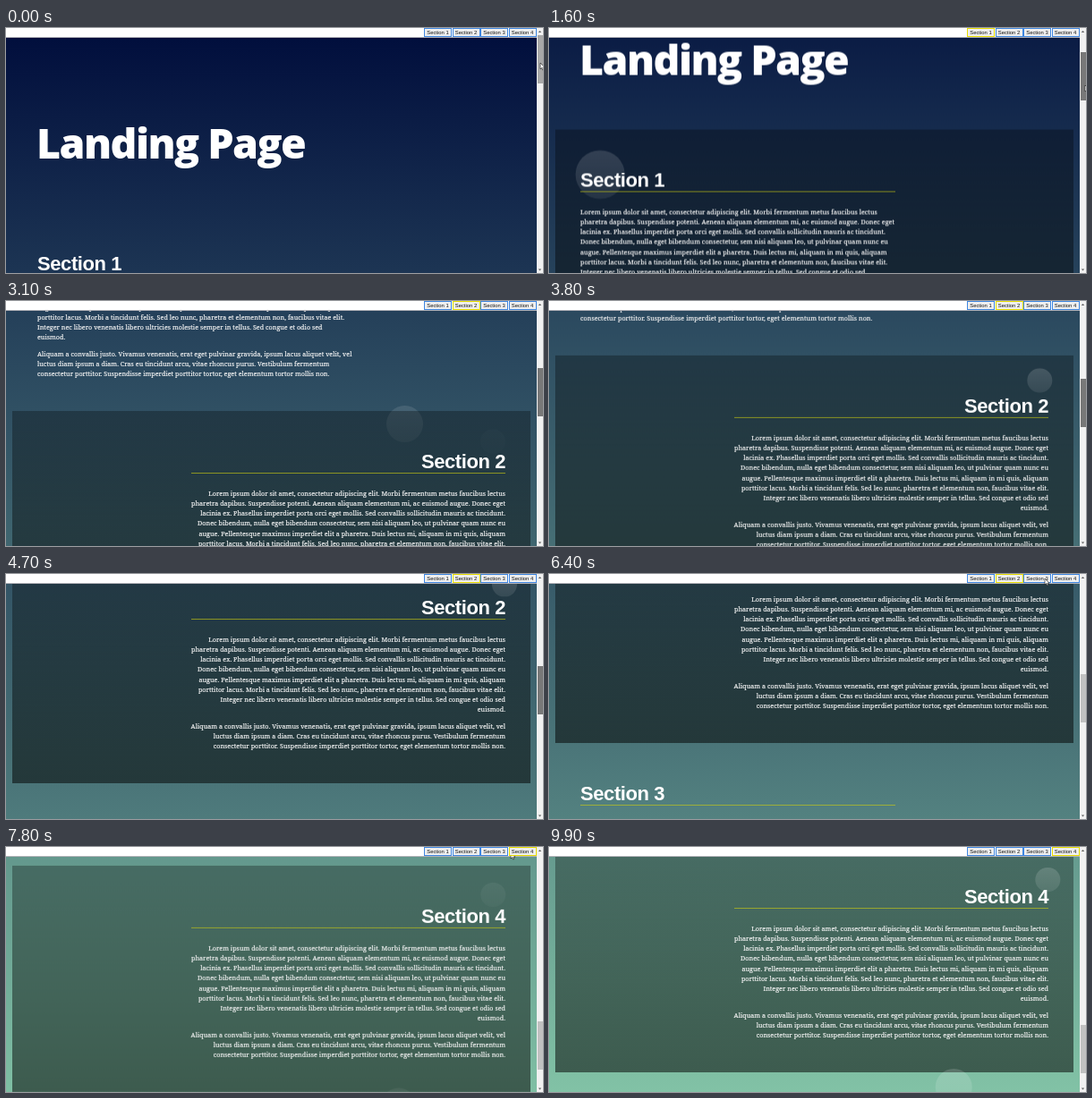
Animation of 600 by 274 pixels, one loop 10 s. Source, as an HTML page:

```html
<!DOCTYPE html>
<html lang="en">
<head>
<meta charset="utf-8">
<title>Landing Page</title>
<style>
html, body { margin: 0; width: 100%; height: 100%; overflow: hidden; }
#stage { position: relative; width: 600px; height: 274px; overflow: hidden; background: #000d3c; }
#page { position: absolute; left: 0; top: 0; width: 593px; height: 1303px;
  background: linear-gradient(#000d3c, #88cbab); will-change: transform; }
h1, h2, p { margin: 0; position: absolute; white-space: nowrap; }
h1 { left: 34px; top: 95.5px; font: 800 46.5px/64px "Open Sans", sans-serif; letter-spacing: -1.55px; color: #fff; }
section { position: absolute; left: 7px; width: 579px; height: 253px; }
.shade { position: absolute; inset: 0; background: linear-gradient(rgba(0,0,0,.3), rgba(0,0,0,.52)); }
.text { position: absolute; left: 28px; top: 0; width: 351.5px; height: 100%; }
.even .text { left: 199.5px; text-align: right; }
h2 { left: 0; right: 0; top: 45px; height: 24.5px; font: 700 22px/24px "Liberation Sans", Arial, sans-serif;
  letter-spacing: -.42px; color: #fff; border-bottom: 1px solid rgba(204,204,17,.62); }
p { left: 0; right: 0; font: 7.15px/11.25px "Noto Serif", serif; letter-spacing: .046px;
  color: #f4f4f4; -webkit-text-stroke: .18px #f4f4f4; }
p.a { top: 87.2px; }
p.b { top: 184.1px; }
p span { display: block; }
.orb { position: absolute; border-radius: 50%; background: linear-gradient(rgba(255,255,255,.16), rgba(255,255,255,.09)); }
#nav { position: absolute; left: 0; top: 0; width: 593px; height: 10px; background: #fff; border-bottom: 1px solid rgba(0,0,20,.3); }
#nav div { position: absolute; top: 0; width: 31px; height: 10px; box-sizing: border-box;
  border: 1.3px solid #3f86e0; background: #efefef; color: #111; text-align: center;
  font: 5.9px/9.2px "Liberation Sans", Arial, sans-serif; }
#nav div.on { border-color: #e6dc00; }
#bar { position: absolute; left: 593px; top: 0; width: 7px; height: 274px; background: #f1f1f1; }
#thumb { position: absolute; left: 1px; width: 6px; height: 54px; }
svg { position: absolute; overflow: visible; left: 0; top: 0; }
</style>
</head>
<body>
<div id="stage">
  <div id="page"><h1>Landing Page</h1></div>
  <div id="nav"></div>
  <div id="bar">
    <div id="thumb"></div>
    <svg width="7" height="274" fill="#606060"><path d="M1.8 5 3.5 3 5.2 5zM1.8 269.5l1.7 2 1.7-2z"/></svg>
  </div>
  <svg id="cursor" width="6" height="9"><path d="M0 0V7L1.6 5.6 2.7 8 3.8 7.5 2.8 5.2H5Z" fill="#fff" stroke="#111" stroke-width=".6"/></svg>
</div>
<script>
const LOOP = 10000, STEP = 100, TOP = 206.5, HEIGHT = 253, ORBIT = 7;
const FADE_IN = 0.5, FADE_OUT = 0.15;
const paraA = [
  "Lorem ipsum dolor sit amet, consectetur adipiscing elit. Morbi fermentum metus faucibus lectus",
  "pharetra dapibus. Suspendisse potenti. Aenean aliquam elementum mi, ac euismod augue. Donec eget",
  "lacinia ex. Phasellus imperdiet porta orci eget mollis. Sed convallis sollicitudin mauris ac tincidunt.",
  "Donec bibendum, nulla eget bibendum consectetur, sem nisi aliquam leo, ut pulvinar quam nunc eu",
  "augue. Pellentesque maximus imperdiet elit a pharetra. Duis lectus mi, aliquam in mi quis, aliquam",
  "porttitor lacus. Morbi a tincidunt felis. Sed leo nunc, pharetra et elementum non, faucibus vitae elit.",
  "Integer nec libero venenatis libero ultricies molestie semper in tellus. Sed congue et odio sed",
  "euismod."
];
const paraB = [
  "Aliquam a convallis justo. Vivamus venenatis, erat eget pulvinar gravida, ipsum lacus aliquet velit, vel",
  "luctus diam ipsum a diam. Cras eu tincidunt arcu, vitae rhoncus purus. Vestibulum fermentum",
  "consectetur porttitor. Suspendisse imperdiet porttitor tortor, eget elementum tortor mollis non."
];
// seconds during which each section is active
const active = [[1.15, 3.05], [3.05, 6.66], [6.66, 7.62], [7.62, 10]];
// [time, scroll, eased]
const scrollKeys = [[0, 0], [0.15, 0], [1.15, 83], [1.6, 93.5], [3.1, 337], [4.7, 479], [5.6, 524],
  [6.45, 524], [7, 712.5, 1], [7.3, 712.5], [7.91, 967, 1]];
const cursorX = [[0, 597], [1.6, 599], [2.2, 603], [5.6, 603], [6.3, 554], [7, 554], [7.25, 564], [7.9, 564], [8.3, 570]];
const cursorY = [[0, 39], [0.15, 40], [1.6, 64], [3.1, 108], [5.6, 145], [6.3, 5], [7, 5], [7.25, 6], [7.9, 6], [8.3, -12]];

const $ = id => document.getElementById(id);
const add = (parent, tag, cls = "", text = "") => {
  const el = document.createElement(tag);
  el.className = cls;
  el.textContent = text;
  return parent.appendChild(el);
};
const ease = x => x * x * (3 - 2 * x);
function track(keys, t) {
  const i = keys.findIndex(k => k[0] > t);
  if (i < 0) return keys[keys.length - 1][1];
  const [t0, v0] = keys[i - 1], [t1, v1, eased] = keys[i];
  const x = (t - t0) / (t1 - t0);
  return v0 + (v1 - v0) * (eased ? ease(x) : x);
}
function makeOrb(parent, cx, cy, size, period) {
  const el = add(parent, "div", "orb");
  Object.assign(el.style, { left: cx - size / 2 + "px", top: cy - size / 2 + "px", width: size + "px", height: size + "px" });
  return { el, period };
}

const sections = active.map((span, i) => {
  const even = i % 2 === 1;
  const box = add($("page"), "section", even ? "even" : "");
  box.style.top = TOP + HEIGHT * i + "px";
  const shade = add(box, "div", "shade");
  const orbs = [even ? makeOrb(box, 544, 34.8, 27.4, 4) : makeOrb(box, 55.4, 55.4, 54.8, 4)];
  if (i % 3 === 0) orbs.push(makeOrb(box, 438.5, 267.6, 41, -5));
  if (i === 2) orbs.push(makeOrb(box, 565.3, 239.3, 27.4, -5));
  const text = add(box, "div", "text");
  add(text, "h2", "", "Section " + (i + 1));
  [["a", paraA], ["b", paraB]].forEach(([cls, lines]) => {
    const p = add(text, "p", cls);
    lines.forEach(line => add(p, "span", "", line));
  });
  const button = add($("nav"), "div", "", "Section " + (i + 1));
  button.style.left = 467 + 31.5 * i + "px";
  return { span, shade, orbs, button };
});

function drawSection({ span: [on, off], shade, orbs, button }, t) {
  const live = t >= on && t < off;
  shade.style.visibility = live ? "visible" : "hidden";
  button.className = live ? "on" : "";
  button.style.zIndex = live ? 1 : 0;
  const alpha = t < on ? 0 : live ? Math.min(1, (t - on) / FADE_IN) : Math.max(0, 1 - (t - off) / FADE_OUT);
  for (const { el, period } of orbs) {
    const a = (t - on) / period * 2 * Math.PI;
    const r = live ? ORBIT : 0;
    el.style.opacity = alpha;
    el.style.transform = `translate(${-r * Math.cos(a)}px, ${-r * Math.sin(a)}px)`;
  }
}

function draw(now) {
  const t = Math.floor(now % LOOP / STEP) * STEP / 1000;
  const y = track(scrollKeys, t);
  $("page").style.transform = `translateY(${-y}px)`;
  $("thumb").style.top = 8 + y * 0.198 + "px";
  $("thumb").style.background = t < 0.15 ? "#a8a8a8" : t < 5.6 ? "#787878" : "#c1c1c1";
  $("cursor").style.transform = `translate(${track(cursorX, t)}px, ${track(cursorY, t)}px)`;
  sections.forEach(s => drawSection(s, t));
}
function tick() {
  draw(performance.now());
  requestAnimationFrame(tick);
}
tick();
</script>
</body>
</html>
```
